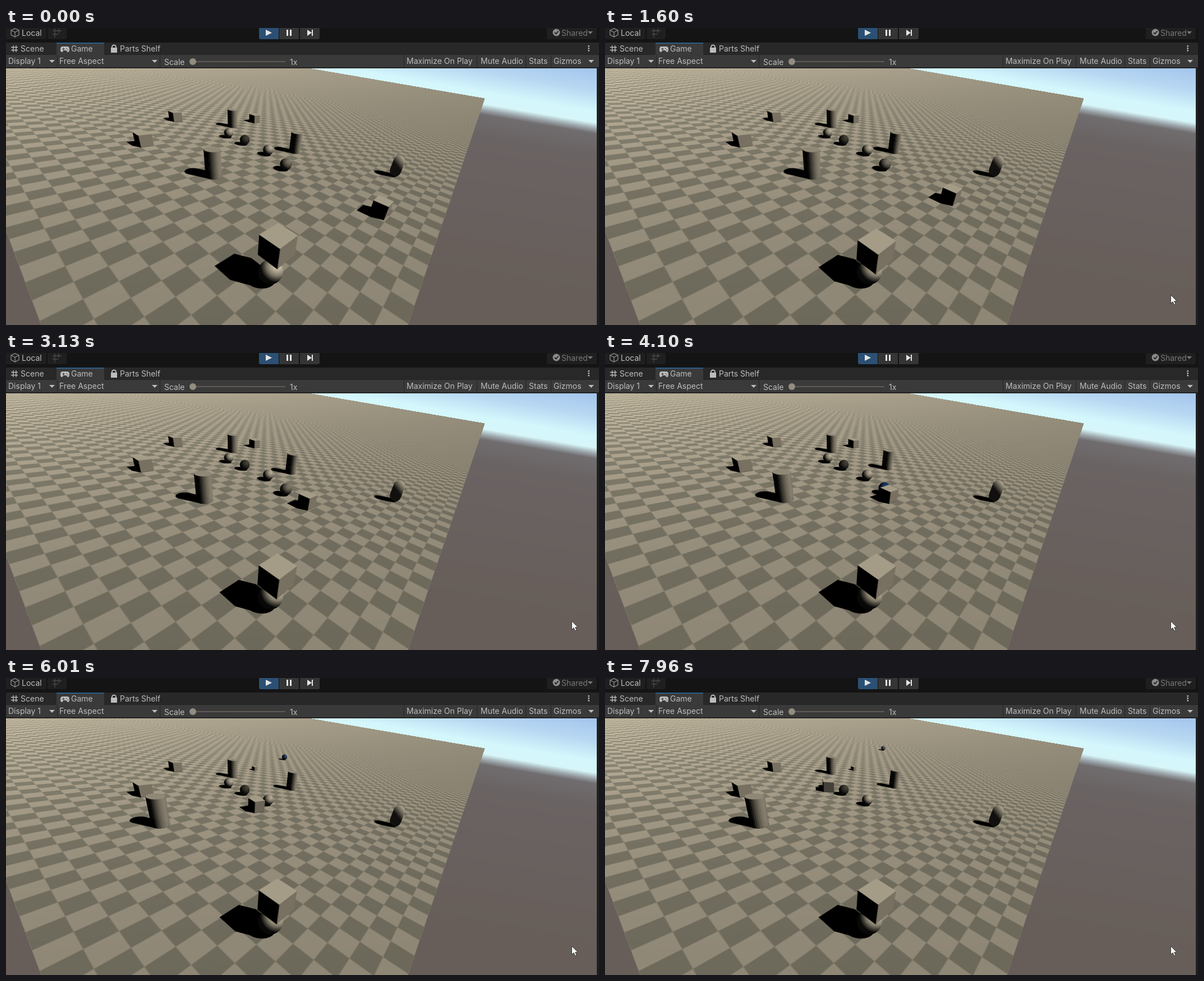
An HTML page with a canvas for the animation above (8000 ms loop, 1057 by 530 pixels).

```html
<!DOCTYPE html>
<html lang="en">
<head>
<meta charset="utf-8">
<title>Game view</title>
<style>
  html, body { margin: 0; width: 100%; height: 100%; overflow: hidden; background: #191919; }
  canvas, svg { position: absolute; left: 0; top: 0; display: block; }
  text { font: 14px Inter, Roboto, sans-serif; fill: #bdbdbd; }
</style>
</head>
<body>
<canvas id="view" width="1057" height="530"></canvas>
<svg width="1057" height="530" viewBox="0 0 1057 530">
  <path fill="#141414" d="M0 0H1057V26H0z"/>
  <path fill="#1f1f1f" d="M0 0H72V17q0 3-3 3H0zM74 0H108V17q0 3-3 3H77q-3 0-3-3zM964 0H1053V17q0 3-3 3H967q-3 0-3-3z"/>
  <path fill="#2b5073" d="M451 0H486V20H454q-3 0-3-3z"/>
  <path fill="#353535" d="M487 0H522V20H487zM524 0H559V17q0 3-3 3H524z"/>
  <path fill="#282828" d="M0 26H1057V48H0z"/>
  <path fill="#3a3a3a" d="M90 26H175V48H90zM0 48H1057V71H0z"/>
  <path fill="#2c5d87" d="M90 26H175V28H90z"/>
  <path fill="#232323" d="M0 47H90V48H0zM175 47H1057V48H175zM0 70H1057V72H0z"/>
  <path stroke="#262626" d="M91.500 48V70M274.500 48V70M709.500 48V70M839.500 48V70M926.500 48V70M971.500 48V70"/>
  <path fill="#202020" d="M1053 71H1057V530H1053z"/>
  <path fill="#e4e4e4" d="M463 3L474 8.500L463 14zM500 3H503V14H500zM506 3H509V14H506zM537 3L545 8.500L537 14zM545 3H547V14H545z"/>
  <g fill="none" stroke="#8d8d8d" stroke-width="1.300">
    <path d="M9 4L16 1L23 4V12L16 16L9 12zM9 4L16 7.500L23 4M16 7.500V16"/>
    <path stroke="#4b4b4b" d="M83 5H99M83 11H93M87 1V17M94 1V9"/>
    <path stroke="#bdbdbd" d="M13 31V43M18 31V43M9 34.500H21M9 39.500H21"/>
    <path stroke="#bdbdbd" stroke-width="1.800" d="M189 36V33.500a3.500 3 0 0 1 7 0V36"/>
  </g>
  <path fill="#bdbdbd" d="M101 33H109q4 0 4 5t-2.500 5q-1.500 0-3-3h-5q-1.500 3-3 3q-2.500 0-2.500-5t4-5zM187 35H198V44H187z"/>
  <path stroke="#3a3a3a" d="M100 37.500H105M102.500 35V40M107 36.500H109M109 39H111"/>
  <circle cx="981" cy="8" r="6.500" fill="#8c8c8c"/>
  <path d="M978 8L980.500 10.500L984.500 5.500" fill="none" stroke="#1f1f1f" stroke-width="1.800"/>
  <g fill="#bdbdbd">
    <path fill="#777" d="M1037 6H1046L1041.500 11z"/>
    <path d="M77 57H87L82 62zM260 57H270L265 62zM1038 57H1048L1043 62z"/>
    <path d="M1037.500 31h2.500v2.500h-2.500zM1037.500 35h2.500v2.500h-2.500zM1037.500 39h2.500v2.500h-2.500z"/>
  </g>
  <path fill="#605c54" d="M333 59H498V61H333z"/>
  <circle cx="333" cy="60" r="6" fill="#938d80"/>
  <text x="28" y="14">Local</text>
  <text x="990" y="14" style="fill:#777">Shared</text>
  <text x="26" y="42">Scene</text>
  <text x="116" y="42">Game</text>
  <text x="203" y="42">Parts Shelf</text>
  <text x="4" y="64">Display 1</text>
  <text x="95" y="64">Free Aspect</text>
  <text x="282" y="66">Scale</text>
  <text x="506" y="66">1x</text>
  <text x="714" y="64">Maximize On Play</text>
  <text x="846" y="64">Mute Audio</text>
  <text x="932" y="64">Stats</text>
  <text x="976" y="64">Gizmos</text>
  <path id="cursor" d="M0 0V15L3.600 11.800L6 17.200L8.400 16.100L6.100 10.900H10.600z" fill="#fff" stroke="#222" stroke-width=".8"/>
</svg>
<script>
const W = 1057, H = 530, TOP = 71, LOOP = 8000;
const CX = 527, CY = 300.5, F = 400.5, EYE = 7.7;
const ctx = document.getElementById('view').getContext('2d');
const cursor = document.getElementById('cursor');

// Camera space: x right, y down, z forward.
const dot = (p, q) => p[0] * q[0] + p[1] * q[1] + p[2] * q[2];
const cross = (p, q) => [p[1] * q[2] - p[2] * q[1], p[2] * q[0] - p[0] * q[2], p[0] * q[1] - p[1] * q[0]];
const unit = v => v.map(c => c / Math.hypot(...v));
const clamp = (v, lo = 0, hi = 1) => Math.min(hi, Math.max(lo, v));
const ease = (t, from, to) => { const k = clamp((t - from) / (to - from)); return k * k * (3 - 2 * k); };

const roll = Math.atan(0.17), pitch = Math.atan(229.5 / F);
const UP = [Math.sin(roll) * Math.cos(pitch), -Math.cos(roll) * Math.cos(pitch), -Math.sin(pitch)];
const E1 = unit([-153 - CX, -48 - CY, F]);
const E2 = unit(cross(E1, UP));

function project([a, b, h]) {
  const [x, y, z] = [0, 1, 2].map(i => a * E1[i] + b * E2[i] + (h - EYE) * UP[i]);
  return [CX + F * x / z, CY + F * y / z, z];
}

// World point at height h seen at a screen position.
function ground(x, y, h = 0) {
  const ray = [x - CX, y - CY, F], t = (EYE - h) / -dot(ray, UP);
  return [t * dot(ray, E1), t * dot(ray, E2), h];
}

// Ground shift of a shadow per unit of height.
const CAST = [0.725, -0.355];
const LIGHT = unit([-CAST[0], -CAST[1], 1]);
const LIGHT_X = 0.72, LIGHT_Y = -0.58;
const SIDE = unit([LIGHT[1], -LIGHT[0], 0]), RIM = cross(LIGHT, SIDE);
const LIT = [212, 200, 174];
const tone = (k, base = LIT) => `rgb(${base.map(c => Math.round(c * k))})`;

// ---- floor and sky ----
const SKY = [[-110, 150, 185, 232], [-45, 183, 215, 242], [-8, 212, 247, 252], [12, 214, 246, 249],
  [22, 157, 167, 172], [31, 112, 109, 111], [70, 106, 99, 99], [330, 103, 94, 89]];
function sky(d) {
  const i = clamp(SKY.filter(s => s[0] <= d).length, 1, SKY.length - 1);
  const p = SKY[i - 1], q = SKY[i], k = clamp((d - p[0]) / (q[0] - p[0]));
  return [1, 2, 3].map(j => p[j] + (q[j] - p[j]) * k);
}

const wave = p => Math.abs(p / 2 - Math.floor(p / 2) - 0.5);
const band = (p, w) => 2 * (wave(p - w / 2) - wave(p + w / 2)) / w;

function paintFloor() {
  const layer = document.createElement('canvas');
  layer.width = W; layer.height = H;
  const c = layer.getContext('2d'), img = c.createImageData(W, H);
  const right = ground(716, 530)[0], near = ground(62, 530)[1], far = ground(853, 125)[1];
  for (let y = TOP; y < H; y++) for (let x = 0; x < 1054; x++) {
    const down = -dot([x - CX, y - CY, F], UP);
    let rgb;
    const [a, b] = down > 0 ? ground(x, y) : [0, -1e9];
    if (a > right && b > near && b < far) {
      const [ax, bx] = ground(x + 1, y), [ay, by] = ground(x, y + 1);
      const wa = Math.abs(ax - a) + Math.abs(ay - a) + 0.02, wb = Math.abs(bx - b) + Math.abs(by - b) + 0.02;
      const k = 0.5 - 0.5 * band(a - right, wa) * band(b - near, wb);
      const gain = 1 + 0.5 * Math.exp((TOP - y) / 140) * (1 - x / 1800);
      rgb = [[107, 34], [103, 30], [89, 27]].map(([dark, rise]) => (dark + rise * k) * gain);
    } else rgb = sky(down / Math.cos(pitch));
    img.data.set([...rgb, 255], (y * W + x) * 4);
  }
  c.putImageData(img, 0, 0);
  return layer;
}

// ---- motion ----
// Keys are [time, screen x, screen y]; the motion itself runs on the ground.
function path(h, ...keys) {
  const pts = keys.map(([t, x, y]) => [t, ...ground(x, y, h)]);
  const rate = (i, j) => (pts[i + 1][j] - pts[i][j]) / (pts[i + 1][0] - pts[i][0]);
  const slope = (i, j) => {
    if (i === 0 || i === pts.length - 1) return 0;
    const p = rate(i - 1, j), q = rate(i, j);
    return p * q > 0 ? 2 * p * q / (p + q) : 0;
  };
  return t => {
    const n = pts.length - 1;
    if (t <= pts[0][0]) return pts[0].slice(1);
    if (t >= pts[n][0]) return pts[n].slice(1);
    const i = pts.findIndex(p => p[0] > t) - 1;
    const d = pts[i + 1][0] - pts[i][0], k = (t - pts[i][0]) / d;
    const at = j => {
      const k2 = k * k, k3 = k2 * k;
      return (2 * k3 - 3 * k2 + 1) * pts[i][j] + (k3 - 2 * k2 + k) * d * slope(i, j)
        + (3 * k2 - 2 * k3) * pts[i + 1][j] + (k3 - k2) * d * slope(i + 1, j);
    };
    return [at(1), at(2), h];
  };
}

// ---- shapes ----
function polygon(points, color) {
  ctx.beginPath();
  points.forEach(p => ctx.lineTo(p[0], p[1]));
  ctx.closePath();
  ctx.fillStyle = ctx.strokeStyle = color;
  ctx.lineWidth = 0.5;
  ctx.fill();
  ctx.stroke();
}

function hull(points) {
  const sorted = points.slice().sort((p, q) => p[0] - q[0] || p[1] - q[1]);
  const half = list => {
    const out = [];
    for (const p of list) {
      while (out.length > 1) {
        const [m, n] = out.slice(-2);
        if ((n[0] - m[0]) * (p[1] - m[1]) > (n[1] - m[1]) * (p[0] - m[0])) break;
        out.pop();
      }
      out.push(p);
    }
    return out.slice(0, -1);
  };
  return [...half(sorted), ...half(sorted.reverse())];
}

const castShadow = points =>
  polygon(hull(points.map(([a, b, h]) => project([a + CAST[0] * h, b + CAST[1] * h, 0]))), '#000');

const ring = (n, make) => Array.from({ length: n }, (_, i) => make(i * 2 * Math.PI / n));
const disc = ([a, b], h, n, r, turn = 0) =>
  ring(n, w => [a + Math.cos(w + turn) * r, b + Math.sin(w + turn) * r, h]);
const ballRim = p => ring(28, w => p.map((c, i) => c + (SIDE[i] * Math.cos(w) + RIM[i] * Math.sin(w)) / 2));

// Upright solid between two equal rings: the sides that face the camera, then the lid.
function drawPrism(p, low, high, lid) {
  low.forEach((q, i) => {
    const n = (i + 1) % low.length;
    const ma = (q[0] + low[n][0]) / 2, mb = (q[1] + low[n][1]) / 2;
    const [na, nb] = unit([ma - p[0], mb - p[1]]);
    if (ma * na + mb * nb > 0) return;
    const k = Math.max(0, na * LIGHT[0] + nb * LIGHT[1]);
    polygon([q, low[n], high[n], high[i]].map(project), tone(k));
  });
  polygon(high.map(project), tone(lid));
}

const cubeRing = (p, o, side) =>
  disc(p, p[2] + side * o.size / 2, 4, o.size * Math.SQRT1_2, Math.PI / 4 + (o.yaw || 0));
const cube = {
  outline: (p, o) => [...cubeRing(p, o, -1), ...cubeRing(p, o, 1)],
  draw: (p, o) => drawPrism(p, cubeRing(p, o, -1), cubeRing(p, o, 1), LIGHT[2])
};

const cylinder = {
  outline: p => [...disc(p, 0, 28, 0.53), ...disc(p, 2, 28, 0.53)],
  draw: p => drawPrism(p, disc(p, 0, 28, 0.53), disc(p, 2, 28, 0.53), 0.68)
};

const ball = {
  outline: ballRim,
  draw(p, o) {
    const [x, y, z] = project(p), r = F / z / 2, base = o.tint || LIT, k = o.shade || 0.95;
    const g = ctx.createRadialGradient(x + r * 0.55, y - r * 0.48, 0, x + r * 0.55, y - r * 0.48, r * 1.35);
    g.addColorStop(0, o.gloss ? '#fffdf4' : tone(0.9 * k, base));
    g.addColorStop(0.2, tone(0.85 * k, base));
    g.addColorStop(0.6, tone(0.55 * k, base));
    g.addColorStop(1, tone(0.04, base));
    ctx.fillStyle = g;
    ctx.beginPath();
    ctx.arc(x, y, r, 0, 7);
    ctx.fill();
  }
};

const capsule = {
  outline: ([a, b]) => [...ballRim([a, b, 0.5]), ...ballRim([a, b, 1.5])],
  draw([a, b, h]) {
    const [x, y, z] = project([a, b, h]), low = project([a, b, 0.5]), high = project([a, b, 1.5]);
    const reach = F / z * 1.1, width = F / z * 1.06;
    const g = ctx.createLinearGradient(x, y, x + LIGHT_X * reach, y + LIGHT_Y * reach);
    g.addColorStop(0, tone(0.08));
    g.addColorStop(0.4, tone(0.42));
    g.addColorStop(0.9, tone(0.82));
    ctx.strokeStyle = g;
    ctx.lineWidth = width;
    ctx.lineCap = 'round';
    ctx.beginPath();
    ctx.moveTo(low[0], low[1]);
    ctx.lineTo(high[0], high[1]);
    ctx.stroke();
  }
};

// ---- scene ----
const still = (x, y, h) => path(h, [0, x, y]);
const mix = (p, q, k) => p.map((c, i) => c + (q[i] - c) * k);
const fixed = [
  [cube, still(245, 198, 0.5), { size: 1 }],
  [cube, still(302, 157, 0.5), { size: 1 }],
  [ball, still(397, 187, 0.5), {}],
  [ball, still(425.5, 199.5, 0.5), { shade: 0.36 }],
  [ball, still(467.5, 217.5, 0.5), {}],
  [ball, still(471.5, 435, 0.5), { gloss: true, shade: 1.1 }],
  [capsule, still(697.5, 246, 1), {}],
  [cylinder, path(0, [2300, 370, 264], [4100, 321, 261], [5120, 290, 260], [6000, 276, 262]), {}],
  [cylinder, path(0, [1950, 514, 221], [4100, 502, 206], [5120, 504, 202], [7030, 512, 195], [7960, 514, 194.5]), {}],
  [cylinder, path(0, [7100, 404, 176], [7960, 403, 170]), {}]
];
const crate = still(483, 397, 1.5);
const chaser = path(0.5, [0, 669, 320], [990, 655, 314], [2240, 571, 277], [4100, 506, 252],
  [5120, 477, 242], [7030, 414, 207], [7960, 398, 192]);
const struck = path(0.5, [3800, 499, 243], [4100, 498, 241], [5120, 497, 163], [7030, 496, 129], [7960, 496, 125]);

function sceneAt(t) {
  const size = 1 - 0.5 * ease(t, 4200, 4900);
  const drop = 0.27 * (1 - clamp(t / 240) ** 2);
  const [a, b, h] = crate(t);
  const blue = ease(t, 3800, 4050) * (1 - 0.7 * ease(t, 5200, 7800));
  const moving = [
    [cube, ground(443, 161, size / 2), { size }],
    [cube, [a, b, h + drop], { size: 1 }],
    [cube, chaser(t), { size: 1, yaw: 0.58 * clamp((t - 5120) / 2840) }],
    [ball, struck(t), { tint: mix(LIT, [55, 105, 190], blue), shade: 0.65 }]
  ];
  return [...fixed.map(([shape, at, o]) => [shape, at(t), o]), ...moving]
    .sort((p, q) => project(q[1])[2] - project(p[1])[2]);
}

const floor = paintFloor();
function frame(now) {
  const t = now % LOOP, scene = sceneAt(t);
  ctx.drawImage(floor, 0, 0);
  scene.forEach(([shape, p, o]) => castShadow(shape.outline(p, o)));
  scene.forEach(([shape, p, o]) => shape.draw(p, o));
  const k = ease(t, 350, 810), settle = t < 1900 ? 0 : t < 2600 ? 1 : 2;
  cursor.setAttribute('transform', `translate(${1024 - 15.5 * k} ${531 - 54.500 * k + settle})`);
  requestAnimationFrame(frame);
}
requestAnimationFrame(frame);
</script>
</body>
</html>
```
